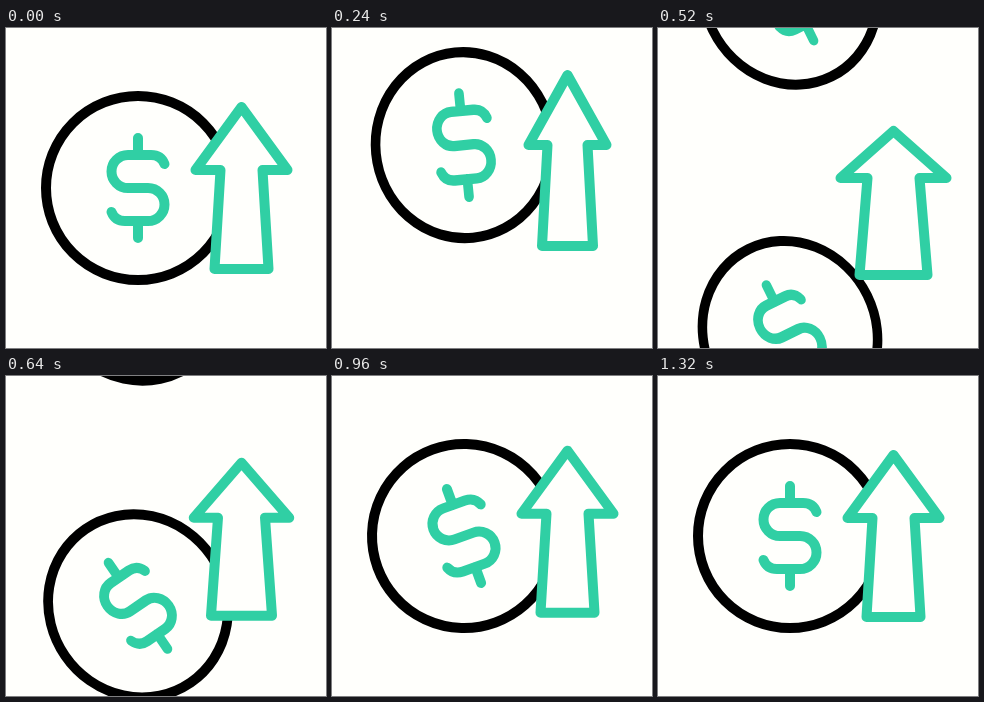
Write an HTML page that moves like this. It is 320 px wide and 320 px high and loops after 1400 ms.

```html
<!DOCTYPE html>
<html lang="en">
<head>
<meta charset="utf-8">
<title>Rising coin</title>
<style>
  html, body { margin: 0; width: 100%; height: 100%; overflow: hidden; background: #fffffc; }
  svg { display: block; width: 100vw; height: 100vh; }
  svg * { fill: none; stroke: #30cfa4; stroke-width: 10; stroke-linecap: round; stroke-linejoin: round; }
  svg circle { stroke: #000; }
  svg #arrow { fill: #fffffc; }
</style>
</head>
<body>
<svg viewBox="0 0 320 320">
  <defs>
    <path id="dollar" d="M26.5-24Q23-33 13-33H-10A16.5 16.5 0 0 0-10 0H10A16.5 16.5 0 0 1 10 33H-13Q-23 33-26.5 24M0-33V-50M0 33V50"/>
  </defs>
  <g class="coin"><circle r="92"/><use href="#dollar"/></g>
  <g class="coin"><circle r="92"/><use href="#dollar"/></g>
  <path id="arrow"/>
</svg>
<script>
const LOOP = 1400, STEP = 40;
const COIN_X = 132, COIN_Y = 160, ARROW_X = 235.5, ARROW_BASE = 241;

const progress = (t, from, to) => Math.min(1, Math.max(0, (t - from) / (to - from)));
const smooth = u => u * u * (3 - 2 * u);
const glide = u => (u + smooth(u)) / 2;
const bump = (t, from, to) => Math.sin(Math.PI * progress(t, from, to));

const coins = document.querySelectorAll('.coin');
const arrow = document.getElementById('arrow');

// One coin leaves through the top while its successor rises from below.
function drawCoins(t) {
  const leavingY = COIN_Y - 258 * glide(progress(t, 120, 680));
  const arrivingY = COIN_Y + 372 * (1 - glide(progress(t, 120, 800))) - 14 * bump(t, 1040, 1320);
  const tilt = -40 * (glide(progress(t, 120, 760)) - smooth(progress(t, 840, 1080)));
  const stretch = bump(t, 120, 760);
  [leavingY, arrivingY].forEach((y, i) => {
    coins[i].setAttribute('transform',
      `translate(${COIN_X} ${y}) rotate(${tilt}) scale(${1 - 0.07 * stretch} ${1 + 0.02 * stretch})`);
    coins[i].lastElementChild.setAttribute('transform', `scale(1 ${1 + 0.05 * stretch})`);
  });
}

// The arrow jumps, lands with a squash, then jumps once more.
function drawArrow(t) {
  const rise = bump(t, 120, 360), land = bump(t, 340, 700), hop = bump(t, 620, 980);
  const base = ARROW_BASE - 23 * rise + 6 * land - 25 * hop;
  const head = base - 99 - 2 * rise + 2 * land;
  const tip = base - 162 - 9 * rise + 18 * land;
  const headHalf = 46 - 7 * rise + 7 * land * land;
  const neckHalf = 21 - rise + 5 * land;
  const baseHalf = 27 - 1.5 * rise + 7 * land;
  const side = dir => [[headHalf, head], [neckHalf, head], [baseHalf, base]]
    .map(([x, y]) => [ARROW_X + dir * x, y]);
  arrow.setAttribute('d', `M${[[ARROW_X, tip], ...side(1), ...side(-1).reverse()].join('L')}Z`);
}

const start = performance.now();
function frame() {
  const elapsed = (performance.now() - start) % LOOP;
  const t = Math.floor(elapsed / STEP) * STEP;
  drawCoins(t);
  drawArrow(t);
  requestAnimationFrame(frame);
}
frame();
</script>
</body>
</html>
```
